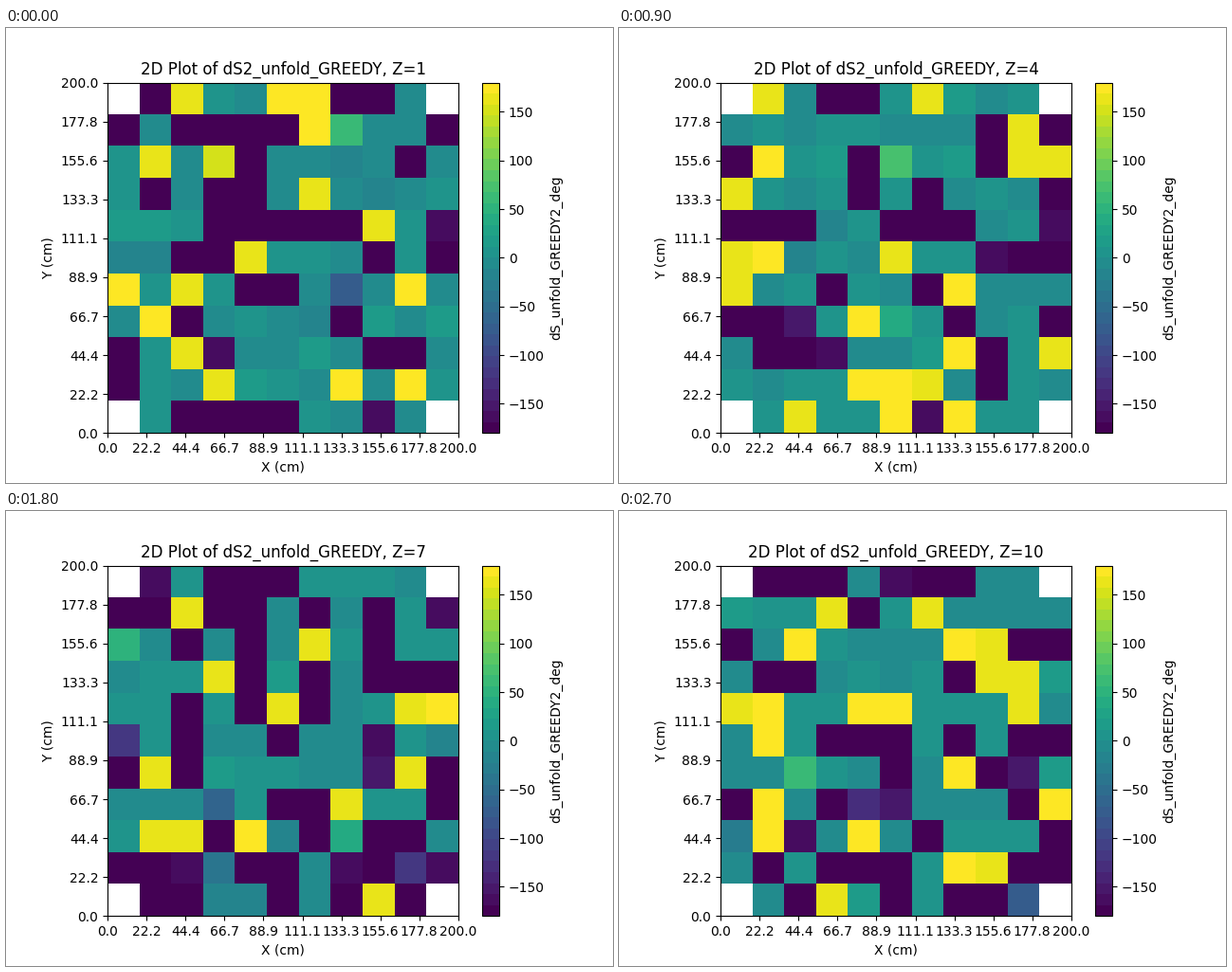
These frames come from a looping animation (640 px wide and 480 px high, 3 s). A matplotlib script:

```python
import numpy as np
import matplotlib.pyplot as plt
from matplotlib.animation import FuncAnimation

LAYERS = 10
CELLS = 11
SIDE = 200
LIMIT = 180


def layer_values(z):
    """Angles of one layer: mostly near zero or at either end of the range."""
    rng = np.random.default_rng(40 + z)
    shape = (CELLS, CELLS)
    kinds = [
        rng.normal(0, 8, shape),
        np.full(shape, -LIMIT),
        rng.uniform(158, LIMIT, shape),
        rng.uniform(-168, -150, shape),
        rng.uniform(-140, 160, shape),
    ]
    pick = rng.choice(len(kinds), size=shape, p=[0.45, 0.31, 0.15, 0.03, 0.06])
    values = np.choose(pick, kinds)
    values[::CELLS - 1, ::CELLS - 1] = np.nan  # empty corners
    return values


fig, ax = plt.subplots(figsize=(6.4, 4.8), dpi=100)
image = ax.imshow(
    layer_values(1),
    origin="lower",
    extent=(0, SIDE, 0, SIDE),
    cmap=plt.get_cmap("viridis", 32),
    vmin=-LIMIT,
    vmax=LIMIT,
    interpolation="nearest",
)
fig.colorbar(image, ax=ax, label="dS_unfold_GREEDY2_deg")

ticks = np.linspace(0, SIDE, 10)
labels = [f"{t:.1f}" for t in ticks]
ax.set_xticks(ticks, labels)
ax.set_yticks(ticks, labels)
ax.set_xlabel("X (cm)")
ax.set_ylabel("Y (cm)")
title = ax.set_title("", pad=6.7)


def update(frame):
    z = frame + 1
    image.set_data(layer_values(z))
    title.set_text(f"2D Plot of dS2_unfold_GREEDY, Z={z}")
    return image, title


anim = FuncAnimation(fig, update, frames=LAYERS, interval=300, repeat=True)
plt.show()
```
